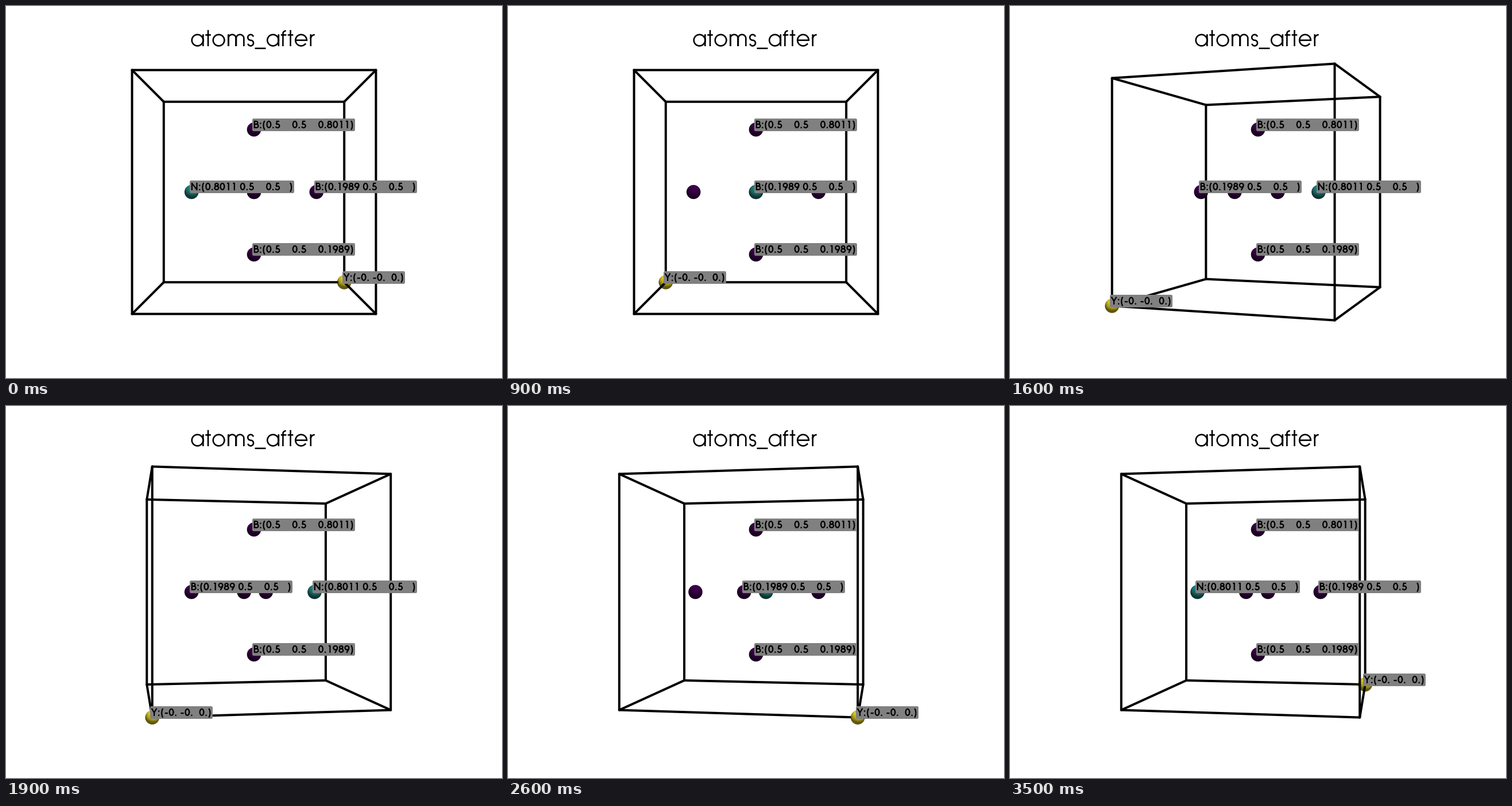
Animation, 864 px wide and 648 px high, one loop 3600 ms. Source, as a matplotlib script:

```python
from itertools import combinations, product
from math import ceil, floor

import numpy as np
import matplotlib.pyplot as plt
from matplotlib.animation import FuncAnimation
from matplotlib.patches import FancyBboxPatch, PathPatch
from matplotlib.path import Path
from matplotlib.transforms import Affine2D

W, H = 864, 648
FRAMES, INTERVAL = 36, 100
HALF_VIEW = np.radians(15)
FOCAL = H / 2 / np.tan(HALF_VIEW)
DIST = np.sqrt(3) / 2 / np.sin(HALF_VIEW)
BALL = 12.25

fig = plt.figure(figsize=(W / 72, H / 72), dpi=72, facecolor="white")
ax = fig.add_axes([0, 0, 1, 1])
ax.axis("off")


# Geometric stroke lettering, 1000 units per em

CAP, XTOP = 740, 515
ADVANCE = {**dict.fromkeys("01589", 560), **dict.fromkeys(" .:", 280),
           **dict.fromkeys("()", 380), **dict.fromkeys("ftr", 315),
           **dict.fromkeys("aoe", 660), "-": 420, "_": 500, "s": 388,
           "B": 580, "Y": 620, "N": 740, "m": 938}


def arc(cx, cy, rx, ry, start, stop):
    t = np.radians(np.linspace(start, stop, 40))
    return list(zip(cx + rx * np.cos(t), cy + ry * np.sin(t)))


def ring(cx, cy, rx, ry):
    return arc(cx, cy, rx, ry, 0, 365)


def stem(x, top=CAP):
    return [(x, 0), (x, top)]


def bar(x0, x1, y):
    return [(x0, y), (x1, y)]


def strokes(ch, w):
    c = w / 2
    mid, bowl = 273, 258
    loop, arch = bowl / 2, 178
    pen, wide = 65, 190
    top = CAP - pen
    low, high = 0.27 * (top - pen), 0.23 * (top - pen)
    left = 2 * pen
    dot = stem(c, left)
    shapes = {
        "a": [ring(c, mid, bowl, bowl), stem(c + bowl, 2 * mid)],
        "o": [ring(c, mid, bowl, bowl)],
        "e": [bar(c - bowl, c + bowl, mid) + arc(c, mid, bowl, bowl, 0, 325)],
        "t": [stem(c), bar(0.1 * w, 0.9 * w, XTOP)],
        "f": [stem(0.4 * w, CAP - 1.4 * loop)
              + arc(0.4 * w + loop, CAP - 1.3 * loop, loop, loop, 180, 85),
              bar(0.1 * w, 0.9 * w, XTOP)],
        "s": [arc(c, mid + loop, loop, loop, 15, 270)
              + arc(c, mid - loop, loop, loop, 90, -165)],
        "r": [stem(110, 2 * mid), arc(110 + arch, 2 * mid - 1.13 * arch, arch, arch, 180, 88)],
        "m": [stem(110, 2 * mid)]
             + [[(x - arch, 0)] + arc(x, XTOP - 0.9 * arch, arch, arch, 180, 0)
                + [(x + arch, 0)] for x in (110 + arch, 110 + 3 * arch)],
        "_": [bar(0, w, -100)],
        ".": [dot],
        ":": [dot, [(x, y + 410) for x, y in dot]],
        "-": [bar(0.15 * w, 0.85 * w, 270)],
        "(": [arc(w - 50, 290, wide, 450, 108, 252)],
        ")": [arc(50, 290, wide, 450, 72, -72)],
        "0": [ring(c, CAP / 2, wide, CAP / 2 - pen)],
        "1": [[(c - 100, top), (c + 40, top), (c + 40, 0)]],
        "5": [[(c + 170, top), (c - pen, top), (c - 115, CAP / 2)]
              + arc(c, pen + low, wide, 1.08 * low, 130, -160)],
        "8": [ring(c, top - high, 0.8 * wide, high), ring(c, pen + low, wide, low)],
        "9": [ring(c, top - wide, wide, wide), [(c + 0.9 * wide, CAP / 2), (c - 35, 0)]],
        "B": [stem(left), [(left, top)] + arc(300, top - high, high, high, 90, -90)
              + [(left, top - 2 * high)],
              [(left, pen + 2 * low)] + arc(335, pen + low, low, low, 90, -90) + [(left, pen)]],
        "N": [stem(left), stem(w - left), [(left, top), (w - left, pen)]],
        "Y": [stem(c, 0.45 * CAP), [(0.1 * w, CAP), (c, 0.45 * CAP), (0.9 * w, CAP)]],
    }
    return shapes.get(ch, [])


def lettering(text, em, weight, x, y, z):
    """Return a stroked patch for the text and the text's width."""
    verts, codes, pen, k = [], [], 0, em / 1000
    for ch in text:
        for line in strokes(ch, ADVANCE[ch]):
            verts += [(x + k * (pen + px), y - k * py) for px, py in line]
            codes += [Path.MOVETO] + [Path.LINETO] * (len(line) - 1)
        pen += ADVANCE[ch]
    patch = PathPatch(Path(verts, codes), fill=False, ec="black", lw=weight,
                      capstyle="butt", joinstyle="miter", zorder=z)
    return ax.add_patch(patch), k * pen


class Label:
    TOP, HEIGHT = -20, 22

    def __init__(self, text):
        glyphs, width = lettering(text, 18, 2.2, -1.5, -3, 21)
        self.width = ceil(width + 3)
        box = FancyBboxPatch((-3, self.TOP), self.width, self.HEIGHT, fc="#808080",
                             ec="none", boxstyle="round,pad=0,rounding_size=2.5", zorder=20)
        self.parts = [ax.add_patch(box), glyphs]

    def hits(self, other):
        first, second = sorted((self, other), key=lambda label: label.x)
        return (second.x - first.x < first.width
                and abs(self.y - other.y) < self.HEIGHT)

    def place(self, x, y, shown):
        """Show the label unless it would cover one shown earlier."""
        self.x, self.y = floor(x), ceil(y - 0.01)
        shift = Affine2D().translate(self.x, self.y) + ax.transData
        visible = not any(self.hits(other) for other in shown)
        for part in self.parts:
            part.set_transform(shift)
            part.set_visible(visible)
        if visible:
            shown.append(self)


def light(power, elevation, azimuth):
    e, a = np.radians([elevation, azimuth])
    return power, np.array([np.sin(a) * np.cos(e), np.sin(e), np.cos(a) * np.cos(e)])


KEY, FILL, HEAD = light(0.78, 50, 10), light(0.25, -75, 0), light(0.25, 0, 0)
LIGHTS = [KEY, FILL, HEAD, light(0.21, 0, 110), light(0.21, 0, -110)]


class Ball:
    N = 30

    def __init__(self, color):
        self.color = np.array(color) / 255
        self.image = ax.imshow(np.zeros((self.N, self.N, 4)), aspect="auto",
                               interpolation="nearest")

    def place(self, x, y, z):
        """Shade the ball on the pixel grid around its centre."""
        n = self.N
        x0, y0 = floor(x) - n // 2, floor(y) - n // 2
        steps = np.arange(n) + 0.5
        u, v = np.meshgrid((x0 + steps - x) / BALL, (y - y0 - steps) / BALL)
        r = np.hypot(u, v)
        normal = np.stack([u, v, np.sqrt(np.clip(1 - r**2, 0, 1))], axis=-1)
        glow = sum(p * np.clip(normal @ d, 0, None) for p, d in LIGHTS)
        rgb = np.clip(glow[..., None] * self.color, 0, 1)
        alpha = np.clip((1 - r) * BALL + 0.5, 0, 1)
        self.image.set_data(np.dstack([rgb, alpha]))
        self.image.set_extent((x0, x0 + n, y0 + n, y0))
        self.image.set_zorder(z)


# Scene: cell coordinates become (right, depth, up) about the centre

def view(cell, angle):
    x, y, z = 0.5 - np.array(cell)
    c, s = np.cos(angle), np.sin(angle)
    return np.array([x * c - y * s, x * s + y * c, -z])


def project(p):
    k = FOCAL / (DIST + p[1])
    return W / 2 + k * p[0], H / 2 - k * p[2]


def leave_ball(a, b):
    """Start an edge where it comes out of the ball at its end."""
    return a + (b - a) * BALL * (DIST + a[1]) / FOCAL


COLORS = {"B": (68, 1, 84), "N": (33, 145, 140), "Y": (253, 231, 37)}
atoms = []
for axis, offset in product(range(3), (0.1989, 0.8011)):
    cell = [0.5] * 3
    cell[axis] = offset
    kind = "N" if cell[0] > 0.5 else "B"
    numbers = " ".join(f"{v:<6g}" for v in cell)
    atoms.append((cell, Ball(COLORS[kind]), Label(f"{kind}:({numbers})")))
atoms.append(([0] * 3, Ball(COLORS["Y"]), Label("Y:(-0. -0.  0.)")))

edges = [(a, b, ax.plot([], [], color="black", lw=4, solid_capstyle="round", snap=False)[0])
         for a, b in combinations(product((0, 1), repeat=3), 2)
         if sum(b) - sum(a) == 1 and all(p <= q for p, q in zip(a, b))]

lettering("atoms_after", 38, 2.6, 321, 70, 30)
ax.set_xlim(0, W)
ax.set_ylim(H, 0)


def update(frame):
    angle = 2 * np.pi * frame / FRAMES
    for a, b, line in edges:
        p, q = view(a, angle), view(b, angle)
        line.set_zorder(5 - (p[1] + q[1]) / 2)
        if not any(a):
            p = leave_ball(p, q)
        line.set_data(*zip(project(p), project(q)))

    shown = []
    for cell, ball, label in atoms:
        p = view(cell, angle)
        ball.place(*project(p), 5 - p[1])
        label.place(*project(p), shown)


anim = FuncAnimation(fig, update, frames=FRAMES, interval=INTERVAL,
                     repeat=True, repeat_delay=0, blit=False)
plt.show()
```
